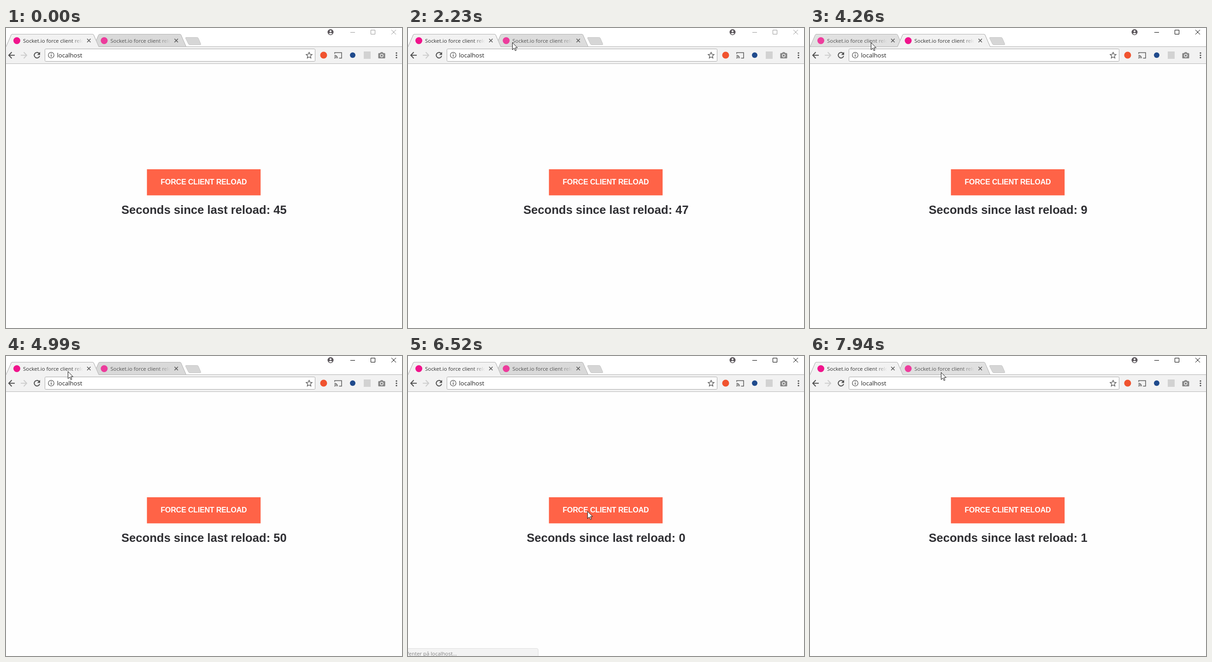
Recreate the animation shown at these times as an HTML page. Size 859x652 px, loop 8 s.

```html
<!DOCTYPE html>
<html lang="en">
<head>
<meta charset="utf-8">
<title>Force client reload</title>
<style>
html, body { margin: 0; width: 100%; height: 100%; overflow: hidden; background: #fff; }
svg { display: block; }
.ui { font-family: "Open Sans", "Noto Sans", sans-serif; }
.bold { font: bold 16px "Liberation Sans", Arial, sans-serif; }

/* Everything shares one 8 s clock; 1% = 80 ms. */
.idle1, .idle2, .front1, .front2, .frame, .button, .status, .cursor, .count::after {
  animation: 8s linear infinite;
}

.idle1, .idle2 { fill: #d9d9d9; color: #555; --icon: .8; }
.front1, .front2 { fill: #f2f2f2; color: #333; --icon: 1; }
.icon { opacity: var(--icon); }
.idle1 { animation-name: glow1; }
.idle2 { animation-name: glow2; }
.front1, .front2, .frame { animation-timing-function: step-end; }
.front1 { animation-name: first; }
.front2 { animation-name: second; }
.frame { fill: none; stroke: #999; animation-name: focus; }

@keyframes glow1 {
  0%, 49.4% { fill: #d9d9d9; }
  53%, 100% { fill: #e1e1e1; }
}
@keyframes glow2 {
  0%, 27% { fill: #d9d9d9; }
  28%  { fill: #dcdcdc; }
  31.9%, 34% { fill: #e1e1e1; }
  34.1%, 97.25% { fill: #d9d9d9; }
  99.25%, 100% { fill: #e0e0e0; }
}
@keyframes first {
  0%, 57.25% { visibility: visible; }
  34% { visibility: hidden; }
}
@keyframes second {
  0%, 57.25% { visibility: hidden; }
  34% { visibility: visible; }
}
@keyframes focus {
  0% { stroke: #999; }
  34%, 100% { stroke: #000; }
}

.button { fill: #ff6347; animation-name: hover; }
@keyframes hover {
  0%, 67.5%, 77.5%, 100% { fill: #ff6347; }
  69.75%, 77.4% { fill: #ff826b; }
}

.count {
  position: absolute; top: 380px; left: 0; width: 859px;
  text-align: center; white-space: pre; color: #2f2f33;
  font: bold 25.6px/30px "Liberation Sans", Arial, sans-serif;
}
.count::after {
  content: "45";
  animation-name: seconds;
  animation-timing-function: step-end;
}
@keyframes seconds {
  0% { content: "45"; }
  4.25% { content: "46"; }
  17.125% { content: "47"; }
  30% { content: "48"; }
  34% { content: "7"; }
  36.75% { content: "8"; }
  49.25% { content: "9"; }
  57.25% { content: "50"; }
  68.25% { content: "51"; }
  77.5% { content: "0"; }
  91.25%, 100% { content: "1"; }
}

.status { opacity: 0; animation-name: status; }
@keyframes status {
  0%, 75.5% { opacity: 0; }
  77.5%, 80% { opacity: 1; }
  81.5%, 82.2% { opacity: .8; }
  83.4%, 100% { opacity: 0; }
}

.top { position: absolute; top: 0; left: 0; }
.cursor { animation-name: point; animation-timing-function: ease-in-out; }
@keyframes point {
  0%, 8.3% { transform: translate(771px, 660px); }
  8.375% { transform: translate(771px, 636px); }
  14.25%, 21.125% { transform: translate(483px, 415px); }
  27.875%, 46.5% { transform: translate(226px, 31px); }
  52.25%, 62.3% { transform: translate(132px, 31px); }
  62.375%, 63.125% { transform: translate(134px, 33px); }
  69.875%, 70.95% { transform: translate(388px, 336px); }
  71%, 87% { transform: translate(389px, 337px); }
  96.25%, 97.2% { transform: translate(288px, 41px); }
  99.25%, 100% { transform: translate(284px, 35px); }
}
</style>
</head>
<body>
<svg width="859" height="652" viewBox="0 0 859 652">
  <defs>
    <linearGradient id="ramp" gradientUnits="userSpaceOnUse" x1="140" x2="167" y1="0" y2="0">
      <stop offset="0" stop-color="#fff"/>
      <stop offset="1" stop-color="#000"/>
    </linearGradient>
    <mask id="fade" maskUnits="userSpaceOnUse" x="30" y="14" width="137" height="26">
      <rect x="30" y="14" width="137" height="26" fill="url(#ramp)"/>
    </mask>
    <g id="tab">
      <path d="M0 41L11.3 15.2Q12 13.5 14 13.5H187.5Q189.5 13.5 190.2 15.2L201.5 41" stroke="#b0b0b0"/>
      <circle class="icon" cx="23.5" cy="27.5" r="7.5" fill="#f0148c"/>
      <text class="ui" x="37" y="32" font-size="11.4" fill="currentColor" mask="url(#fade)">Socket.io force client reload</text>
      <path d="M176 23.5L183.5 31M183.5 23.5L176 31" fill="none" stroke="#5a5a5a" stroke-width="1.6"/>
    </g>
  </defs>

  <rect width="859" height="41" fill="#fff"/>
  <rect y="78" width="859" height="574" fill="#fefefe"/>
  <rect y="41" width="859" height="36" fill="#f2f2f2"/>
  <path d="M0 77.5H859" stroke="#b6b6b6"/>

  <!-- tab strip -->
  <path d="M391 20.5H414.5Q416.5 20.5 417.3 22.3L422.5 34.5Q423.3 36.5 421 36.5H399Q396.5 36.5 395.7 34.6L389.6 22.3Q389 20.5 391 20.5Z" fill="#d6d6d6" stroke="#c6c6c6"/>
  <use href="#tab" class="idle1"/>
  <use href="#tab" class="idle2" x="189.5"/>
  <path d="M0 40.5H859" stroke="#b0b0b0"/>
  <use href="#tab" class="front1"/>
  <use href="#tab" class="front2" x="189.5"/>

  <!-- window controls -->
  <circle cx="704" cy="9" r="6.5" fill="#5a555a"/>
  <circle cx="704" cy="7" r="2.1" fill="#fff"/>
  <path d="M700 12.3Q704 8.7 708 12.3Q704 15.6 700 12.3Z" fill="#fff"/>
  <path class="frame" d="M747 9.5H757M791.5 4.5H800.5V13.5H791.5ZM836 4L846 14M846 4L836 14"/>

  <!-- toolbar -->
  <g fill="none" stroke-width="2">
    <path d="M19 59.2H6.5M12.5 52.5L6 59.2L12.5 66" stroke="#505050"/>
    <path d="M32 59.2H44.5M38.5 52.5L45 59.2L38.5 66" stroke="#cdcdcd"/>
    <path d="M71.6 55A6 6 0 1 0 73 60.8" stroke="#505050"/>
  </g>
  <path d="M74 52V58.4H67.6Z" fill="#505050"/>
  <rect x="84.5" y="45.5" width="586" height="27" rx="2" fill="#fff" stroke="#a8a8a8"/>
  <circle cx="98" cy="59" r="6.2" fill="none" stroke="#555" stroke-width="1.3"/>
  <path d="M98 58V62.5M98 55V56.6" stroke="#555" stroke-width="1.6"/>
  <text class="ui" x="110.5" y="64" font-size="13.1" fill="#222">localhost</text>
  <path d="M657.5 52.8L659.4 57.1L664 57.6L660.5 60.7L661.5 65.3L657.5 62.9L653.5 65.3L654.5 60.7L651 57.6L655.6 57.1Z" fill="none" stroke="#555" stroke-width="1.3"/>

  <circle cx="689" cy="59" r="7.5" fill="#f0532f"/>
  <g fill="none" stroke="#5a5a5a" stroke-width="1.5">
    <path d="M713 56V53.5H728V65.5H722.5"/>
    <path d="M712.5 59.2A6.5 6.5 0 0 1 719 65.8M712.5 62A3.8 3.8 0 0 1 716.3 65.8"/>
  </g>
  <circle cx="713.2" cy="65.2" r="1.1" fill="#5a5a5a"/>
  <circle cx="752" cy="59" r="6" fill="#1f4a8c"/>
  <rect x="776" y="51" width="15" height="16" fill="#d2d2d2"/>
  <path d="M809 54.5H811.5L813 52.5H817L818.5 54.5H821Q822.5 54.5 822.5 56V64.5Q822.5 66 821 66H809Q807.5 66 807.5 64.5V56Q807.5 54.5 809 54.5Z" fill="#858585"/>
  <circle cx="815" cy="60" r="3" fill="#858585" stroke="#f2f2f2" stroke-width="1.4"/>
  <g fill="#505050">
    <circle cx="847" cy="54.3" r="1.6"/>
    <circle cx="847" cy="59.3" r="1.6"/>
    <circle cx="847" cy="64.3" r="1.6"/>
  </g>

  <!-- page -->
  <rect class="button" x="305.7" y="307" width="246.6" height="56.7"/>
  <text class="bold" x="429" y="340" text-anchor="middle" letter-spacing="-.17" fill="#fff">FORCE CLIENT RELOAD</text>

  <g class="status">
    <path d="M-2 635.5H279Q282.5 635.5 282.5 639V653H-2Z" fill="#f1f1f1" stroke="#d8d8d8"/>
    <text class="ui" x="-5" y="651" font-size="11.4" fill="#666">Venter på localhost...</text>
  </g>
</svg>
<div class="count">Seconds since last reload: </div>
<svg class="top" width="859" height="652" viewBox="0 0 859 652">
  <path class="cursor" d="M.5 .7V16.3L4.1 12.9L6.6 18.4L8.9 17.4L6.5 12H11.4Z" fill="#fff" stroke="#111"/>
</svg>
</body>
</html>
```
